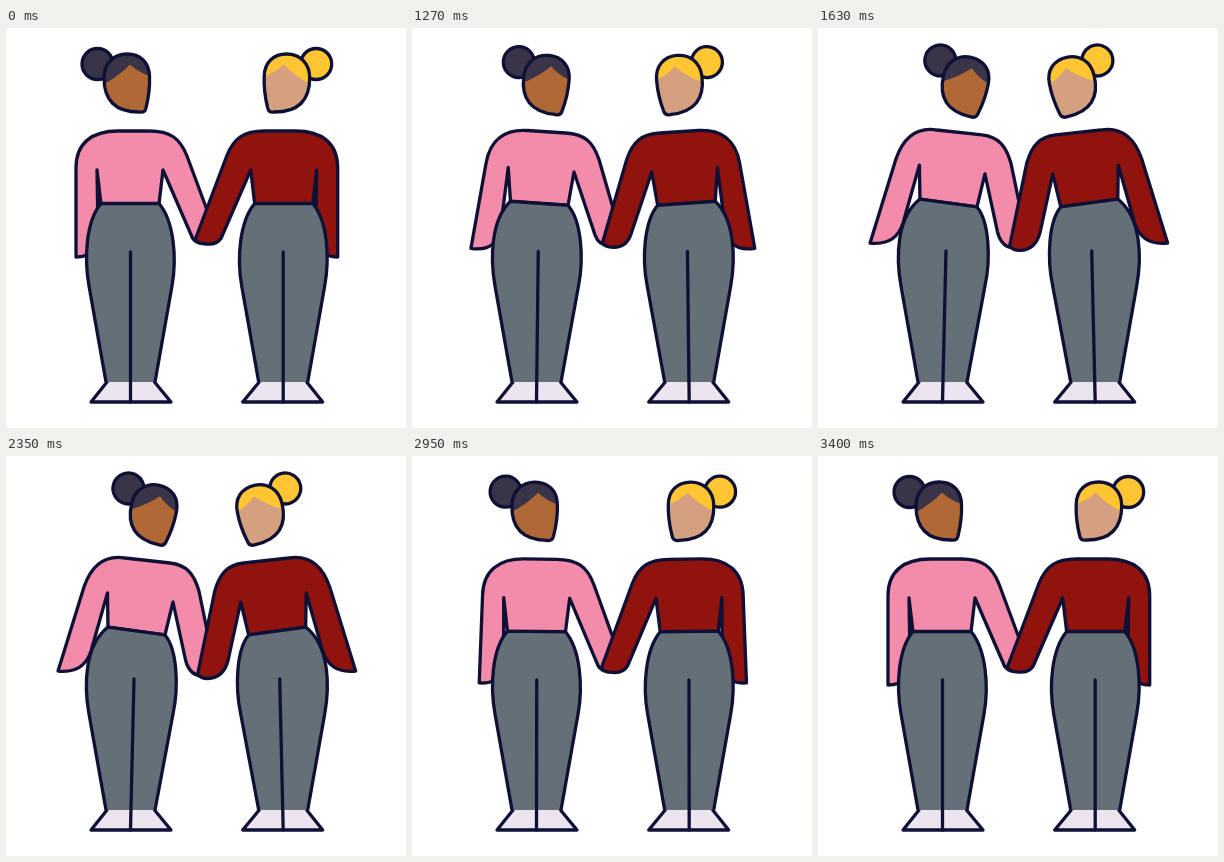
An HTML page that plays this animation: 400x400 px, repeating every 3.43 s.

```html
<!DOCTYPE html>
<html lang="en">
<head>
<meta charset="utf-8">
<title>Holding hands</title>
<style>
  html, body { margin: 0; width: 100%; height: 100%; overflow: hidden; background: #fff; }
  svg { display: block; width: 100vw; height: 100vh; }
</style>
</head>
<body>
<svg id="stage" viewBox="0 0 400 400" stroke="#0f1035" stroke-width="3.3"
     stroke-linejoin="round" stroke-linecap="round"></svg>
<script>
const LOOP = 3430;
const MIRROR = 401.7;
const stage = document.getElementById('stage');

// Each pair holds the upright and the leaning pose; numbers are blended.
const FREE_TIP = ['70 229', '52 215'];
const SHOULDERS = [
  'L70 140 C70 115 86 103 112 103 L143 103 C164 103 174 110 181 128',
  'L78 131 C86 108 100 99 119 102 L164 107 C181 109 188 118 193 135'
];
const FRONT_HAND = [
  'L212.3 211 Q211 216 201 216 Q191 217 186.5 210',
  'L210 218 Q207 222.5 200 222.5 Q184 222 179.5 204'
];
const BACK_HAND = [
  'L204 190 Q208 205 201 214 Q191 217 186.5 210',
  'L205.3 195 Q207 214 201 220 Q184 222 179.5 204'
];
const WAIST = [
  'L157 142 L153 176 L95 176 L91 142 L92 205 C92 222 84 229 ',
  'L167 146 L159 179 L102 171 L101.5 137 L85 195 C80 210 70 217 '
];
const LEGS = [
  'M100 354 L83 258 C78 230 80 193 95 175.5 L153 175.5 C168 193 171 230 166 258 L149 354',
  'M100 354 L83 258 C78 230 78 190 102 171 L159 179 C171 193 173 230 167 258 L149 354'
];
const SEAM = ['M124.5 224 L124.5 374', 'M128 223 L124.5 374'];

// Head paths are centred on the head itself.
const HEAD = 'M-23 -5 C-23 -20 -13 -29 0 -29 C13 -29 22 -21 22.5 -7 ' +
  'C23 5 21 17 19 25 Q18 30 12 29 C-12 29 -23 17 -23 -5 Z';
const HAIR = 'M-23 1 Q-8 -7 3 -18.5 Q11 -11 22.5 -7 C22 -21 13 -29 0 -29 C-13 -29 -23 -20 -23 -5 Z';

function add(parent, tag, attrs) {
  const el = document.createElementNS('http://www.w3.org/2000/svg', tag);
  for (const key in attrs) el.setAttribute(key, attrs[key]);
  parent.appendChild(el);
  return el;
}

function blend([from, to], k) {
  const ends = to.match(/-?[\d.]+/g);
  let i = 0;
  return from.replace(/-?[\d.]+/g, n => (+n + (ends[i++] - n) * k).toFixed(2));
}

function makePerson({ skin, hair, top, hand, flip }) {
  const root = add(stage, 'g', { transform: flip ? `translate(${MIRROR} 0) scale(-1 1)` : '' });
  const sweater = add(root, 'path', { fill: top });
  add(root, 'path', { d: 'M101 354 L85 374 L165 374 L148.5 354', fill: '#ece5ef' });
  const legs = add(root, 'path', { fill: '#656f78', 'stroke-linecap': 'butt' });
  const seam = add(root, 'path', { fill: 'none' });
  const head = add(root, 'g', {});
  add(head, 'circle', { cx: -29.5, cy: -19, r: 15.5, fill: hair });
  add(head, 'path', { d: HEAD, fill: skin, stroke: 'none' });
  add(head, 'path', { d: HAIR, fill: hair, stroke: 'none' });
  add(head, 'path', { d: HEAD, fill: 'none' });

  return lean => {
    // The free hand leads the rest of the body slightly.
    const tip = blend(FREE_TIP, Math.pow(lean, 0.7));
    const body = [SHOULDERS, hand, WAIST].map(part => blend(part, lean)).join(' ');
    sweater.setAttribute('d', `M${tip} ${body} ${tip} Z`);
    legs.setAttribute('d', blend(LEGS, lean));
    seam.setAttribute('d', blend(SEAM, lean));
    head.setAttribute('transform',
      `translate(${121 + 26 * lean} ${55 + 2.6 * lean}) rotate(${13 * lean})`);
  };
}

// Cubic easing with flat ends; x1 and x2 are the handle positions in time.
function ease(t, x1, x2) {
  if (t <= 0) return 0;
  if (t >= 1) return 1;
  let lo = 0, hi = 1;
  for (let i = 0; i < 24; i++) {
    const s = (lo + hi) / 2, r = 1 - s;
    if (3 * r * r * s * x1 + 3 * r * s * s * x2 + s * s * s < t) lo = s;
    else hi = s;
  }
  return lo * lo * (3 - 2 * lo);
}

function leanAt(ms) {
  return ease((ms - 1000) / 700, 0.4, 0.3) - ease((ms - 2290) / 810, 0.8, 0.51);
}

const people = [
  makePerson({ skin: '#b06935', hair: '#393448', top: '#f38bab', hand: BACK_HAND, flip: false }),
  makePerson({ skin: '#d5a080', hair: '#ffc533', top: '#91130d', hand: FRONT_HAND, flip: true })
];

function draw(ms) {
  const lean = Math.max(0, leanAt(ms % LOOP));
  people.forEach(pose => pose(lean));
}

const start = performance.now();
function tick() {
  draw(performance.now() - start);
  requestAnimationFrame(tick);
}
draw(0);
requestAnimationFrame(tick);
</script>
</body>
</html>
```
